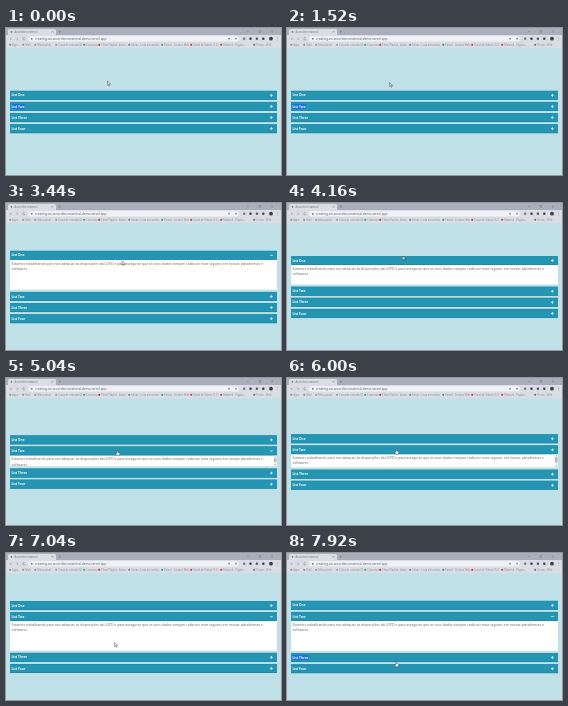
Animation, 275 px wide and 147 px high, one loop 8000 ms. Source, as an HTML page with a canvas:

```html
<!DOCTYPE html>
<html lang="en">
<head>
<meta charset="utf-8">
<title>Accordion</title>
<style>
html, body { margin: 0; width: 100%; height: 100%; overflow: hidden; background: #bfe0e7; }
canvas { display: block; width: 275px; height: 147px; }
</style>
</head>
<body>
<canvas id="stage"></canvas>
<script>
const W = 275, H = 147, LOOP = 8000;
const canvas = document.getElementById('stage');
const scale = window.devicePixelRatio || 1;
canvas.width = W * scale;
canvas.height = H * scale;
const c = canvas.getContext('2d');
c.scale(scale, scale);

const LABELS = ['List One', 'List Two', 'List Three', 'List Four'];
const BODY = [
  'Estamos trabalhando para nos adequar às disposições da LGPD e para assegurar que os seus dados estejam cada vez mais seguros em nossas plataformas e',
  'softwares.'
];
const ROW = 9, GAP = 2.1, FULL = 30, SLIDE = 350, MIDDLE = 84;

// row, opening time, closing time
const OPENINGS = [[0, 3030, 4083], [1, 4960, 5888], [1, 6740, 9999]];
// row, start and end of its text selection
const SELECTIONS = [[1, 0, 2980], [2, 7880, 8000]];
// time, x, y of the pointer tip
const PATH = [
  [0, 101.5, 53], [2300, 103, 55], [2900, 116.5, 65], [3100, 116.5, 65],
  [3700, 116, 53], [4200, 115.5, 53], [4850, 111, 72.5], [5100, 111, 72.5],
  [5600, 109, 65], [5870, 109, 66], [6000, 109, 71], [6450, 108.5, 82.5],
  [6800, 108.5, 82.5], [7500, 109, 108], [8000, 109, 108.7]
];
// x, icon colour, label
const BOOKMARKS = [
  [3, '#8a939e', 'Apps'], [16, '#a58f92', 'Mail'], [28, '#8f9bad', 'Meu painel'],
  [49, '#98a1ad', 'Caixa de entrada (2)'], [77, '#2fb766', 'Conversa'], [92, '#d83a34', 'Filme Playlist - Aulas'],
  [122, '#7b889c', 'Ideias - Lista de tarefas'], [155, '#37a86b', 'Painel - Criativo Web'],
  [184, '#e03730', 'Canal de Vídeos (12)'], [214, '#c94a45', 'Material - Página...'], [247, '#687586', 'Treino - Web']
];

const clamp = v => Math.max(0, Math.min(1, v));

// The CSS "ease" curve
function ease(x) {
  x = clamp(x);
  let lo = 0, hi = 1;
  for (let i = 0; i < 20; i++) {
    const u = (lo + hi) / 2, v = 1 - u;
    if (.75 * v * u + u ** 3 < x) lo = u; else hi = u;
  }
  return .3 * (1 - lo) ** 2 * lo + 3 * (1 - lo) * lo * lo + lo ** 3;
}

function rect(x, y, w, h, color) {
  c.fillStyle = color;
  c.fillRect(x, y, w, h);
}

function pill(x, y, w, h, r, color) {
  c.fillStyle = color;
  c.beginPath();
  c.roundRect(x, y, w, h, r);
  c.fill();
}

function dot(x, y, r, color) {
  c.fillStyle = color;
  c.beginPath();
  c.arc(x, y, r, 0, 7);
  c.fill();
}

function line(points, color, width) {
  c.strokeStyle = color;
  c.lineWidth = width;
  c.beginPath();
  points.forEach(([x, y]) => c.lineTo(x, y));
  c.stroke();
}

function text(str, x, y, size, color, weight = 400) {
  c.font = `${weight} ${size}px "Open Sans", sans-serif`;
  c.textBaseline = 'alphabetic';
  c.fillStyle = color;
  c.fillText(str, x, y);
}

function drawBrowser() {
  const ink = '#6b727c';
  rect(0, 0, W, 7, '#a9afba');
  pill(2, 1, 48, 7, [1.5, 1.5, 0, 0], '#dadee4');
  dot(5.5, 3.8, .9, '#6d7682');
  text('Accordion material', 8.5, 4.8, 2.6, ink);
  line([[45.5, 2.8], [47.3, 4.6]], ink, .4);
  line([[47.3, 2.8], [45.5, 4.6]], ink, .4);
  line([[52.7, 3.7], [54.9, 3.7]], ink, .5);
  line([[53.8, 2.6], [53.8, 4.8]], ink, .5);
  line([[241, 3.5], [243.2, 3.5]], ink, .4);
  c.strokeRect(253, 2.6, 1.8, 1.8);
  line([[265.2, 2.6], [267, 4.4]], ink, .4);
  line([[267, 2.6], [265.2, 4.4]], ink, .4);

  rect(0, 7, W, 13.5, '#dadee4');
  pill(22, 8, 211, 5.4, 2.7, '#eff1f4');
  line([[5.4, 9.6], [4.2, 10.8], [5.4, 12]], ink, .5);
  line([[10.6, 9.6], [11.8, 10.8], [10.6, 12]], ink, .5);
  c.beginPath();
  c.arc(18, 10.8, 1.2, .3, 5.5);
  c.stroke();
  rect(25, 10.1, 1.5, 1.5, ink);
  text('creating-an-accordion-material-demo.vercel.app', 29, 11.8, 3.2, '#5a616a');
  dot(223, 10.7, .9, '#858d97');
  dot(230, 10.7, .9, '#858d97');
  ['#717b87', '#343a43', '#4b5460', '#343a43'].forEach((color, i) => rect(237 + i * 6.4, 9.6, 2.2, 2.2, color));
  dot(265, 10.7, 1.9, '#423d40');
  for (let i = 0; i < 3; i++) dot(271.5, 9.3 + i * 1.4, .35, ink);

  for (const [x, color, label] of BOOKMARKS) {
    dot(x + 1.2, 16.8, 1.1, color);
    text(label, x + 3.3, 17.7, 2.6, '#868d97');
  }
}

function drawRow(i, y, open, selected) {
  rect(4, y, 267, ROW, '#2496b4');
  rect(4, y + ROW - .6, 267, .6, '#1c809c');
  rect(4, y, 267, .5, '#1d86a2');
  if (selected) {
    c.font = '700 3.2px "Open Sans", sans-serif';
    rect(5.5, y + 2, c.measureText(LABELS[i]).width, 5, '#1b6fe0');
  }
  text(LABELS[i], 5.5, y + 5.6, 3.2, '#fff', 700);
  line([[264, y + 4.5], [266.8, y + 4.5]], '#fff', .7);
  if (!open) line([[265.4, y + 3.1], [265.4, y + 5.9]], '#fff', .7);
}

function drawBody(y, h) {
  c.save();
  c.beginPath();
  c.rect(4, y, 267, h);
  c.clip();
  rect(4, y, 267, h, '#fff');
  BODY.forEach((s, i) => text(s, 5.5, y + 5 + i * 5.1, 3.44, '#666'));
  if (h < 15) {
    rect(267.5, y, 3.5, h, '#eef0f1');
    rect(268, y + 3, 2.5, Math.max(0, h - 6) * .7, '#b8bcc0');
    line([[268.4, y + 2], [269.2, y + 1.2], [270, y + 2]], '#666', .4);
    line([[268.4, y + h - 2], [269.2, y + h - 1.2], [270, y + h - 2]], '#666', .4);
  }
  c.restore();
}

function pointerAt(t) {
  const i = Math.max(1, PATH.findIndex(p => p[0] > t));
  const [t0, x0, y0] = PATH[i - 1], [t1, x1, y1] = PATH[i];
  const k = clamp((t - t0) / (t1 - t0)), s = k * k * (3 - 2 * k);
  return [x0 + (x1 - x0) * s, y0 + (y1 - y0) * s];
}

function drawPointer(x, y, hand) {
  const shape = hand
    ? 'M0 0Q.6-.3.7.4V2L2.4 2.5Q2.9 2.7 2.8 3.3L2.3 5.2H-.2L-1.5 3.3Q-1.4 2.7-.3 3.3V.4Z'
    : 'M0 0V4.2L1 3.3L1.6 4.8L2.3 4.5L1.7 3.1H3Z';
  const path = new Path2D(shape);
  c.save();
  c.translate(x, y);
  c.fillStyle = '#fff';
  c.fill(path);
  c.strokeStyle = '#222';
  c.lineWidth = .4;
  c.stroke(path);
  c.restore();
}

function draw(t) {
  const heights = [0, 0, 0, 0], open = [];
  for (const [i, on, off] of OPENINGS) {
    heights[i] += FULL * (ease((t - on) / SLIDE) - ease((t - off) / SLIDE));
    if (t >= on && t < off) open[i] = true;
  }
  const total = 4 * ROW + 3 * GAP + heights.reduce((a, b) => a + b);
  const [px, py] = pointerAt(t);
  let y = MIDDLE - total / 2, hand = false;

  rect(0, 0, W, H, '#bfe0e7');
  drawBrowser();
  LABELS.forEach((_, i) => {
    const selected = SELECTIONS.some(([row, from, to]) => row === i && t >= from && t < to);
    drawRow(i, y, open[i], selected);
    if (py >= y && py <= y + ROW) hand = true;
    if (heights[i] > .1) drawBody(y + ROW, heights[i]);
    y += ROW + GAP + heights[i];
  });
  drawPointer(px, py, hand);
}

const start = performance.now();
function tick() {
  draw((performance.now() - start) % LOOP);
  requestAnimationFrame(tick);
}
tick();
</script>
</body>
</html>
```
